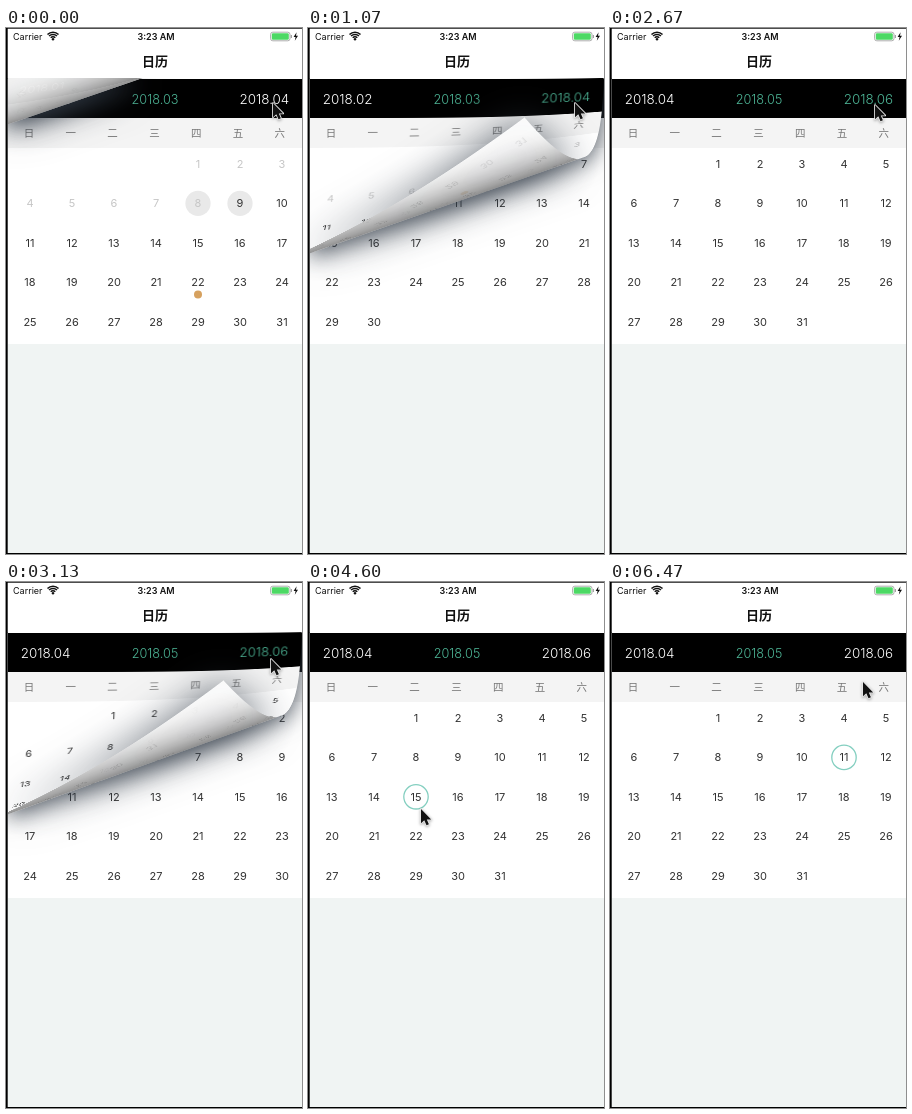
Animation of 296 by 526 pixels, one loop 6.53 s. Source, as an HTML page with a canvas:

```html
<!DOCTYPE html>
<html lang="zh">
<head>
<meta charset="utf-8">
<title>日历</title>
<style>
html, body { margin: 0; width: 100%; height: 100%; overflow: hidden; background: #f0f4f3; }
canvas { display: block; width: 296px; height: 526px; }
</style>
</head>
<body>
<canvas id="stage" width="296" height="526"></canvas>
<script>
const LOOP = 6530, CURL = 650, PRESS = 105;
const X0 = 2, Y0 = 50, W = 294, H = 266;
const SANS = 'Inter, "Noto Sans CJK SC", "Noto Sans CJK", sans-serif';
const CJK = '"Noto Sans CJK SC", "Noto Sans CJK", sans-serif';
const GREEN = '#4db596';

// start time, month shown, month turned to
const turns = [[-523, 2, 3], [685, 3, 4], [1841, 4, 5], [2750, 5, 6], [3710, 6, 5]];
// start time, day with the ring
const picks = [[4530, 15], [5400, 17], [6130, 11]];
// time, x, y of the pointer tip
const pointer = [
  [0, 267, 75], [1270, 267, 75], [1330, 265, 77], [3400, 265, 77],
  [3610, 42, 72], [3730, 42, 72], [3870, 80, 183], [4000, 92, 200],
  [4330, 100, 206], [4470, 104, 213], [4600, 113, 227], [5070, 112, 231],
  [5130, 112, 231], [5400, 193, 213], [5470, 198, 209], [5730, 198, 209],
  [5870, 243, 178], [6070, 241, 180], [6130, 240, 178], [6470, 253, 100], [6530, 253, 100]
];

const clamp = (v, lo = 0, hi = 1) => Math.min(hi, Math.max(lo, v));
const smooth = v => { v = clamp(v); return v * v * (3 - 2 * v); };
const colX = c => 24 + 42 * c;
const rowY = r => 136 + 39.4 * r;

function makeCanvas(w, h) {
  const cv = document.createElement('canvas');
  cv.width = w;
  cv.height = h;
  return cv;
}

function label(g, str, x, y, size, color, weight = 400, family = SANS, align = 'center') {
  g.font = `${weight} ${size}px ${family}`;
  g.textAlign = align;
  g.fillStyle = color;
  g.fillText(str, x, y + size * 0.365);
}

function disc(g, x, y, r, color) {
  g.fillStyle = color;
  g.beginPath();
  g.arc(x, y, r, 0, 2 * Math.PI);
  g.fill();
}

function cell(month, day) {
  const i = new Date(2018, month - 1, 1).getDay() + day - 1;
  return [colX(i % 7), rowY(Math.floor(i / 7))];
}

const pages = {};

// pressed: -1 left month, 1 right month, 0 none
function page(month, pressed = 0) {
  const key = month + '/' + pressed;
  if (pages[key]) return pages[key];
  const cv = makeCanvas(W, H);
  const g = cv.getContext('2d', { willReadFrequently: true });
  g.translate(-X0, -Y0);
  g.fillStyle = '#fff';
  g.fillRect(X0, Y0, W, H);
  g.fillStyle = '#000';
  g.fillRect(X0, Y0 + 1, W, 39);
  g.fillStyle = '#f4f4f4';
  g.fillRect(X0, 90, W, 30);
  [-1, 0, 1].forEach(k => {
    const color = k === 0 || k === pressed ? GREEN : '#fff';
    label(g, '2018.0' + (month + k), 149 + k * 109.4, 71, k ? 13.4 : 12.7, color, 300);
  });
  [...'日一二三四五六'].forEach((d, i) => label(g, d, 23 + 41.8 * i, 105, 10.5, '#777', 400, CJK));

  const days = new Date(2018, month, 0).getDate();
  for (let d = 1; d <= days; d++) {
    const [x, y] = cell(month, d);
    const past = month < 3 || (month === 3 && d < 9);
    if (month === 3 && (d === 8 || d === 9)) disc(g, x, y, 12.6, '#e9e9e9');
    if (month === 3 && d === 22) disc(g, x, y + 12.4, 4, '#d6a15f');
    label(g, d, x, y, 11, past ? '#c6c6c6' : '#333');
  }
  return pages[key] = { cv, data: g.getImageData(0, 0, W, H).data };
}

const stage = document.getElementById('stage');
const ctx = stage.getContext('2d');
const layers = [0, 1, 2].map(() => {
  const cv = makeCanvas(W, H);
  const g = cv.getContext('2d');
  return { cv, g, img: g.createImageData(W, H) };
});

// Bilinear lookup of the sheet, mixed toward a paper tone
function put(out, at, data, px, py, alpha, ink, tone) {
  const x = clamp(px - 0.5, 0, W - 1.001), y = clamp(py - 0.5, 0, H - 1.001);
  const ix = x | 0, iy = y | 0, fx = x - ix, fy = y - iy;
  const i = (iy * W + ix) * 4, j = i + W * 4;
  for (let c = 0; c < 3; c++) {
    const top = data[i + c] * (1 - fx) + data[i + 4 + c] * fx;
    const low = data[j + c] * (1 - fx) + data[j + 4 + c] * fx;
    out[at + c] = (top * (1 - fy) + low * fy) * ink + tone * (1 - ink);
  }
  out[at + 3] = 255 * alpha;
}

const cover = (px, py) => clamp(Math.min(px, py, W - px, H - py) + 0.5);

// Rolls the sheet round a cylinder moving from the lower right to the upper left
function rollSheet(data, f) {
  const angle = Math.min(71, 40 + 48 * f) * Math.PI / 180;
  const R = Math.max(104, 158 - 73 * f);
  const nx = Math.cos(angle), ny = Math.sin(angle);
  const reach = W * nx + H * ny;
  const axis = reach - f * (reach + R);
  const [flat, rise, back] = layers.map(l => l.img.data);
  [flat, rise, back].forEach(d => d.fill(0));

  for (let y = 0; y < H; y++) {
    for (let x = 0; x < W; x++) {
      const at = (y * W + x) * 4, cx = x + 0.5, cy = y + 0.5;
      const d = cx * nx + cy * ny, u = d - axis;
      if (u >= R) continue;
      const bend = u > 0 ? Math.asin(u / R) : 0;
      const edge = clamp(R - u);

      if (u <= 0) {
        put(flat, at, data, cx, cy, 1, 1, 255);
      } else {
        const k = R * bend - u;
        const px = cx + nx * k, py = cy + ny * k;
        const a = cover(px, py) * edge;
        if (a > 0) put(rise, at, data, px, py, a, 1, 255);
      }

      const turn = Math.PI - bend;
      const k = (u > 0 ? R * turn : Math.PI * R - u) - u;
      const px = cx + nx * k, py = cy + ny * k;
      const a = cover(px, py) * edge;
      if (a > 0) {
        const tone = 120 + 133 * smooth((turn - Math.PI / 2) / 0.95);
        put(back, at, data, px, py, a * 0.95, 0.13, tone);
      }
    }
  }
  layers.forEach(l => l.g.putImageData(l.img, 0, 0));
}

function drawLayer(layer, blur, strength, dy) {
  ctx.save();
  if (blur) {
    ctx.shadowColor = `rgba(50,60,72,${strength})`;
    ctx.shadowBlur = blur;
    ctx.shadowOffsetY = dy;
  }
  ctx.drawImage(layer.cv, X0, Y0);
  ctx.restore();
}

function drawTurn(sheet, under, f) {
  ctx.drawImage(under.cv, X0, Y0);
  rollSheet(sheet.data, f);
  const [flat, rise, back] = layers;
  ctx.save();
  ctx.beginPath();
  ctx.rect(X0, Y0, W, 278);
  ctx.clip();
  drawLayer(rise, 22, 0.85, 4);
  drawLayer(flat);
  drawLayer(back, 40, 0.85, 2);
  ctx.restore();
}

function drawChrome() {
  ctx.fillStyle = '#f0f4f3';
  ctx.fillRect(0, 0, 296, 526);
  ctx.fillStyle = '#fff';
  ctx.fillRect(0, 0, 296, 50);
  ctx.fillStyle = '#b5b5b5';
  ctx.fillRect(0, 50, 296, 1);

  label(ctx, 'Carrier', 7, 8.5, 9, '#111', 400, SANS, 'left');
  label(ctx, '3:23 AM', 150, 8.5, 9, '#111', 600);
  label(ctx, '日历', 149, 33, 13, '#111', 700, CJK);

  ctx.strokeStyle = '#111';
  ctx.lineWidth = 1.5;
  [3.2, 5.6, 7.8].forEach(r => {
    ctx.beginPath();
    ctx.arc(47, 12, r, -Math.PI * 0.75, -Math.PI * 0.25);
    ctx.stroke();
  });
  disc(ctx, 47, 11.3, 1.2, '#111');

  ctx.strokeStyle = '#999';
  ctx.lineWidth = 0.8;
  ctx.beginPath();
  ctx.roundRect(264.6, 4.2, 19.4, 8.6, 2.2);
  ctx.stroke();
  ctx.fillStyle = '#4cd964';
  ctx.beginPath();
  ctx.roundRect(265.8, 5.3, 17, 6.4, 1.2);
  ctx.fill();
  ctx.fillStyle = '#999';
  ctx.fillRect(284.8, 7, 1.1, 3);
  ctx.fillStyle = '#111';
  ctx.fill(new Path2D('M290.6 4.2 L287.6 9 H289.6 L288.8 12.8 L292 7.7 H290Z'));
}

function drawFrame() {
  ctx.fillStyle = '#000';
  ctx.fillRect(0, 0, 1.7, 526);
  ctx.fillRect(0, 0, 296, 0.7);
  ctx.fillRect(0, 525, 296, 1);
}

const arrow = new Path2D('M0 0V14.2L3.3 11.2L5.5 16.2L7.9 15.2L5.8 10.4H10.2Z');

function drawPointer(t) {
  const i = Math.max(1, pointer.findIndex(p => p[0] > t));
  const [t0, x0, y0] = pointer[i - 1], [t1, x1, y1] = pointer[i];
  const k = smooth((t - t0) / (t1 - t0));
  ctx.save();
  ctx.translate(x0 + (x1 - x0) * k, y0 + (y1 - y0) * k);
  ctx.shadowColor = 'rgba(0,0,0,.35)';
  ctx.shadowBlur = 3;
  ctx.shadowOffsetY = 1;
  ctx.lineWidth = 1.7;
  ctx.lineJoin = 'round';
  ctx.strokeStyle = '#e8e8e8';
  ctx.stroke(arrow);
  ctx.shadowColor = 'transparent';
  ctx.fillStyle = '#111';
  ctx.fill(arrow);
  ctx.restore();
}

function drawRing(t, month) {
  const pick = picks.filter(p => p[0] <= t).pop();
  if (!pick) return;
  const [x, y] = cell(month, pick[1]);
  ctx.strokeStyle = '#84cfc0';
  ctx.lineWidth = 1.3;
  ctx.beginPath();
  ctx.arc(x, y, 12.2, 0, 2 * Math.PI);
  ctx.stroke();
}

function render(t) {
  drawChrome();
  const [start, from, to] = turns.filter(c => c[0] - PRESS <= t).pop();
  const p = (t - start) / CURL;
  const dir = Math.sign(to - from);
  if (p <= 0) ctx.drawImage(page(from, dir).cv, X0, Y0);
  else if (p >= 1) ctx.drawImage(page(to).cv, X0, Y0);
  else if (dir > 0) drawTurn(page(from, 1), page(to), smooth(p));
  else drawTurn(page(to), page(from), smooth(1 - p));
  drawRing(t, to);
  drawFrame();
  drawPointer(t);
}

const begin = performance.now();
function tick() {
  render((performance.now() - begin) % LOOP);
  requestAnimationFrame(tick);
}
tick();
</script>
</body>
</html>
```
